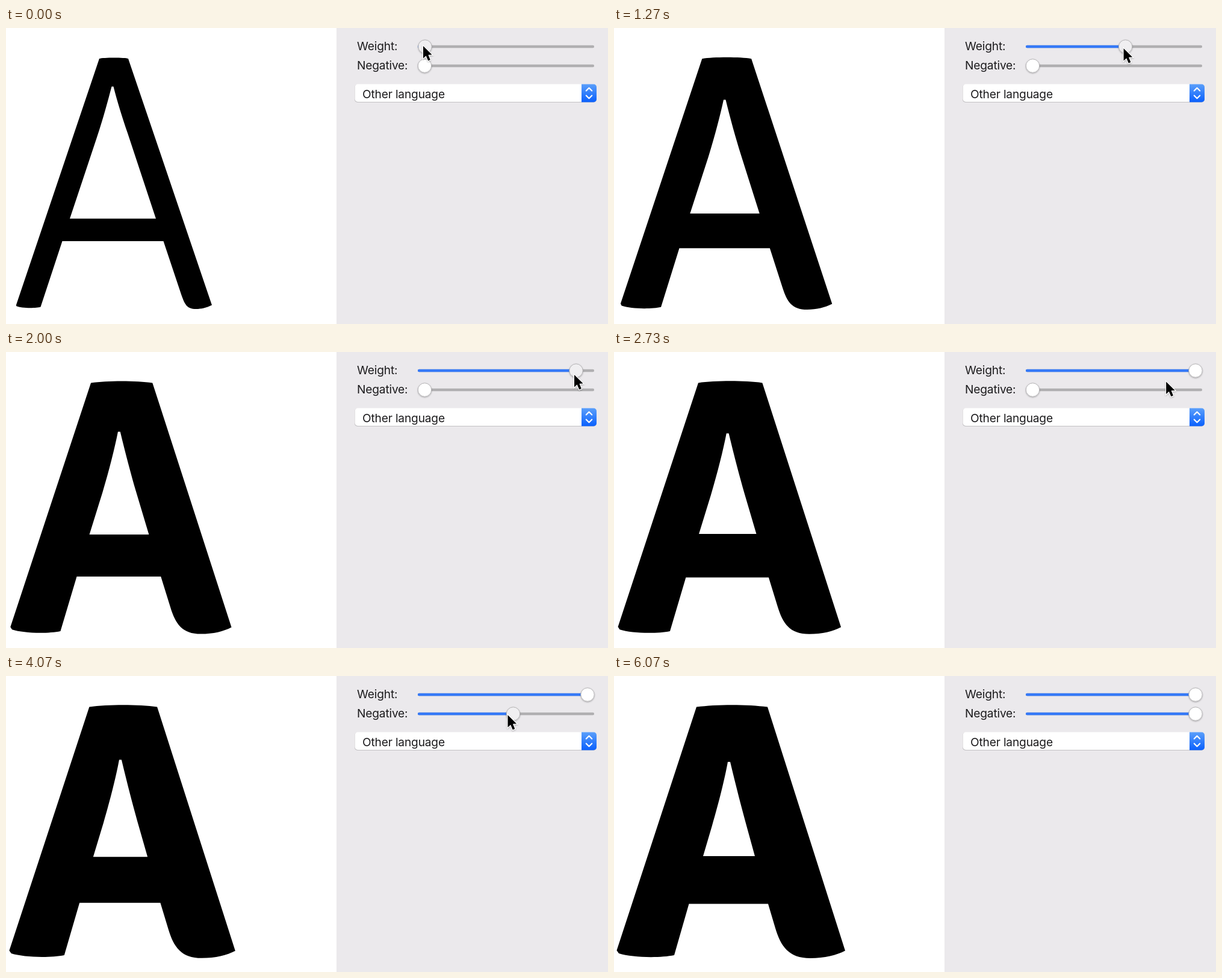
Recreate the animation shown at these times as an HTML page. Size 1000x493 px, loop 6.39 s.

```html
<!DOCTYPE html>
<html lang="en">
<head>
<meta charset="utf-8">
<title>Weight sliders</title>
<style>
html, body { margin: 0; width: 100%; height: 100%; overflow: hidden; background: #fff; }
svg { display: block; width: 1000px; height: 493px; }
text { font: 19.2px Inter, "Open Sans", sans-serif; letter-spacing: -.2px; fill: #1c1b1d; }
.track { stroke: #b0afb1; stroke-width: 4.5; stroke-linecap: round; }
.fill { stroke: #3579f7; }
.knob { fill: #fff; stroke: #b5b4b6; stroke-width: 1; }
.pressed { fill: #f0eff1; }
</style>
</head>
<body>
<svg viewBox="0 0 1000 493">
  <defs>
    <linearGradient id="blue" x2="0" y2="1">
      <stop stop-color="#5b9ffa"/><stop offset="1" stop-color="#0a60fd"/>
    </linearGradient>
    <filter id="shade" x="-50%" y="-50%" width="200%" height="200%">
      <feDropShadow dx="0" dy="1" stdDeviation="1" flood-opacity=".3"/>
    </filter>
  </defs>
  <path id="glyph" fill-rule="evenodd"/>
  <path fill="#ebe9ec" d="M549 0H1000V493H549z"/>
  <text x="583" y="36.5">Weight:</text>
  <text x="583" y="68.5">Negative:</text>
  <g id="sliders"></g>
  <rect x="579" y="94" width="402" height="30" rx="5" fill="#c2c0c3"/>
  <rect x="579.5" y="93.5" width="401" height="29.5" rx="5" fill="#fff"/>
  <path fill="url(#blue)" d="M956 93.5H976a5 5 0 0 1 5 5V118.500a5 5 0 0 1-5 5H956z"/>
  <path fill="none" stroke="#fff" stroke-width="2.2" stroke-linecap="round" stroke-linejoin="round"
    d="M963.800 104.500l4.700-4.700 4.700 4.700M963.800 112.500l4.700 4.700 4.700-4.700"/>
  <text x="592" y="117">Other language</text>
  <path id="cursor" filter="url(#shade)" stroke="#fff" stroke-width="2.4" paint-order="stroke"
    d="M0 0V20.500L4.700 16.200 8.200 24.500 11.800 23 8.400 14.800 14.600 14.600z"/>
</svg>
<script>
const LOOP = 6390, STEP = 1000 / 15;
const MIN = 695.5, MAX = 966;
const RELEASE_WEIGHT = 2330, GRAB_NEGATIVE = 3130, RELEASE_NEGATIVE = 4730, LEAVE = 5060;

const light = `M155 51C161 49 198 49 203 51L342 461.5C333 466 324 468 316 468
  C300 468 297 460 291.500 445L261.500 355L93.500 355L57.500 464.500C50 467 25 467 17 463L17 461Z
  M175.500 97.500L178.500 97.500C184 120 194 152 202 175L249 317.500L106 317.500L151 182
  C162 149 169 122 175.500 97.500Z`;
const black = `M137 51.500C170 47 222 47 255 51.500L384 457.500C370 465 350 470 326 470
  C290 470 277 450 268 420L256 379.500L124.500 379.500L100 465C75 470 30 469 8 462L4.500 457Z
  M189 143L193 143C203 185 212 220 220 249L234 300L148 300L163 249
  C174 211 184 171 189 143Z`;

// [time, x, y] of the pointer tip
const pointer = [
  [70, 693, 30], [530, 753, 30], [1270, 847, 34], [2000, 944, 38], [2200, 978, 40],
  [2330, 978, 40], [2670, 954, 48], [3130, 686.5, 59], [3330, 686.5, 59],
  [3600, 721, 62], [3930, 797, 64], [4600, 976, 69], [5070, 1003, 74]
];
// [time, boldness] while the first slider is dragged
const boldness = [[70, 0], [530, .27], [670, .32], [1270, .485], [2000, .775], [2200, .835]];

const mix = (a, b, k) => a + (b - a) * k;
const clamp = x => Math.min(MAX, Math.max(MIN, x));
const $ = id => document.getElementById(id);

function at(keys, t) {
  if (t <= keys[0][0]) return keys[0].slice(1);
  const i = keys.findIndex(key => key[0] > t);
  if (i < 0) return keys[keys.length - 1].slice(1);
  const a = keys[i - 1], b = keys[i], k = (t - a[0]) / (b[0] - a[0]);
  return a.slice(1).map((v, j) => mix(v, b[j + 1], k));
}

const number = /[\d.]+/g;
const heavy = black.match(number);
function outline(k) {
  let i = 0;
  return light.replace(number, v => mix(+v, +heavy[i++], k).toFixed(2));
}

function slider(y, x, pressed) {
  const line = (end, cls) => `<path class="track ${cls}" d="M686.200 ${y}H${end}"/>`;
  return line(974.8, "") + (x > MIN ? line(x, "fill") : "") +
    `<circle class="knob ${pressed ? "pressed" : ""}" filter="url(#shade)" cx="${x}" cy="${y}" r="11.2"/>`;
}

function draw(now) {
  const t = Math.floor((now % LOOP + 3.4) / STEP) * STEP;
  const [x, y] = at(pointer, t);
  const weight = t < RELEASE_WEIGHT ? clamp(x + 3) : MAX;
  const negative = t < GRAB_NEGATIVE ? MIN : t < RELEASE_NEGATIVE ? clamp(x + 9) : MAX;
  const extra = .165 * (negative - MIN) / (MAX - MIN);
  $("glyph").setAttribute("d", outline(at(boldness, t)[0] + extra));
  $("sliders").innerHTML = slider(31, weight, t < RELEASE_WEIGHT) +
    slider(63, negative, t >= GRAB_NEGATIVE && t < RELEASE_NEGATIVE);
  $("cursor").setAttribute("transform", `translate(${x} ${y})`);
  $("cursor").style.display = t < LEAVE ? "" : "none";
}

const start = performance.now();
function tick() {
  draw(performance.now() - start);
  requestAnimationFrame(tick);
}
tick();
</script>
</body>
</html>
```
